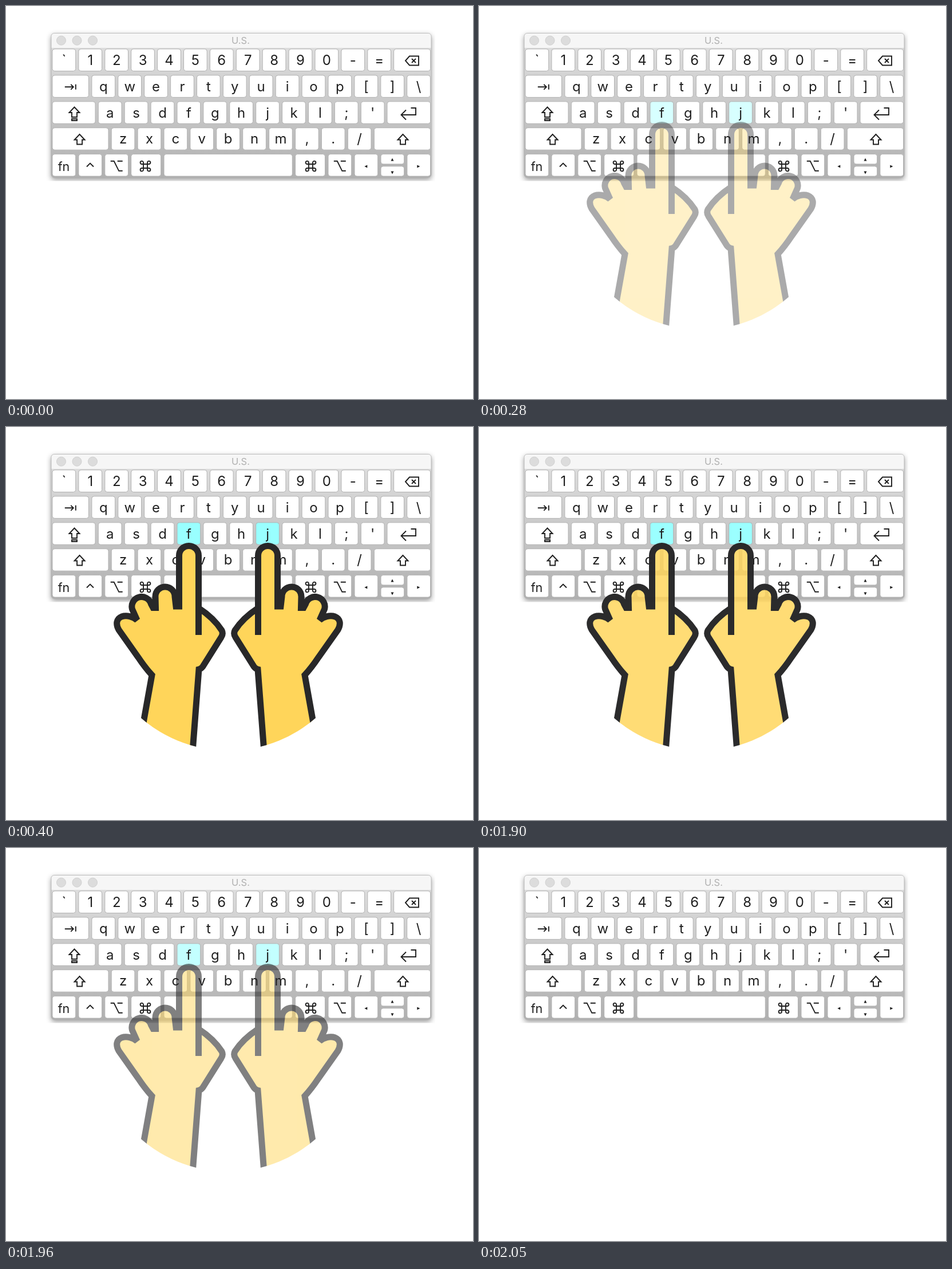
An HTML page that plays this animation: 816 px wide and 686 px high, repeating every 2300 ms.

```html
<!DOCTYPE html>
<html lang="en">
<head>
<meta charset="utf-8">
<title>Home row</title>
<style>
  html, body { margin: 0; width: 100%; height: 100%; overflow: hidden; background: #fff; }
  svg { display: block; }
  text { font: 24px Inter, sans-serif; text-anchor: middle; fill: #1f1f1f; }
  .title { font-size: 16.5px; fill: #b0b0b0; }
  .small { font-size: 21.5px; }
  .key { fill: #fff; stroke: #b2b2b2; }
  .icon { fill: none; stroke: #1f1f1f; stroke-width: 1.9; }
  .solid { fill: #1f1f1f; }
  .hand { fill: #ffd55a; stroke: #282829; stroke-width: 11; stroke-miterlimit: 3; }
</style>
</head>
<body>
<svg width="816" height="686" viewBox="0 0 816 686">
  <defs>
    <linearGradient id="body" x2="0" y2="1">
      <stop stop-color="#e2e2e2"/><stop offset="1" stop-color="#b0b0b0"/>
    </linearGradient>
    <filter id="shadow" x="-10%" y="-20%" width="120%" height="140%">
      <feDropShadow dx="0" dy="3.5" stdDeviation="5" flood-opacity=".42"/>
    </filter>
    <clipPath id="panel"><path d="M66 39H750V305.500H66Z"/></clipPath>
    <clipPath id="cuff"><circle cx="388.5" cy="332.4" r="232.6"/></clipPath>
    <path id="shape" d="M336.500 224.500A17 17 0 0 0 302.500 224.500V313H297L295 296A17 17 0 0 0 261 296L261.500 315.500H257L253.500 309
      A17 17 0 0 0 220.500 318L229 337C222 331 211 328 202 331C192 335 192 345 197 354L231 402Q243 420 255 433
      L234.200 549L325 580L337 423Q341 422 344 418L376 367Q380 361 377 355C368 341 355 328 336.500 316ZM336.500 224V363"/>
  </defs>
  <g clip-path="url(#panel)">
    <rect x="79" y="47.500" width="664" height="252" rx="5" fill="url(#body)" filter="url(#shadow)"/>
    <path d="M79 73V52.500a5 5 0 0 1 5-5H738a5 5 0 0 1 5 5V73Z" fill="#f6f6f6"/>
    <rect x="79" y="47.500" width="664" height="252" rx="5" fill="none" stroke="#aaa" stroke-opacity=".7"/>
  </g>
  <g fill="#dcdcdc" stroke="#d0d0d0">
    <circle cx="96.500" cy="60.200" r="8"/><circle cx="124" cy="60.200" r="8"/><circle cx="151.500" cy="60.200" r="8"/>
  </g>
  <text class="title" x="410" y="66.300">U.S.</text>
  <g id="keys"></g>
  <g id="hands" clip-path="url(#cuff)">
    <use class="hand" href="#shape"/>
    <use class="hand" href="#shape" transform="matrix(-1 0 0 1 777 0)"/>
  </g>
</svg>
<script>
const keys = document.getElementById('keys');
const hands = document.getElementById('hands');
const PITCH = 45.9, TOP = 75, HEIGHT = 38.5;
const homeKeys = [];

function add(tag, attrs) {
  const node = document.createElementNS('http://www.w3.org/2000/svg', tag);
  for (const name in attrs) node.setAttribute(name, attrs[name]);
  return keys.appendChild(node);
}

function addKey(x, row, width = 40.7, dy = 0, height = HEIGHT) {
  return add('rect', { class: 'key', x, y: TOP + row * PITCH + dy, width, height, rx: 4 });
}

function addLabel(label, x, y, cls = '') {
  add('text', { class: cls, x, y }).textContent = label;
}

function addIcon(d, x, y, cls = 'icon') {
  add('path', { class: cls, d, transform: `translate(${x} ${y})` });
}

[['`1234567890-=', 81], ['qwertyuiop[]\\', 149.9], ["asdfghjkl;'", 161.3], ['zxcvbnm,./', 184.2]]
  .forEach(([chars, start], row) => [...chars].forEach((char, i) => {
    const x = start + i * PITCH;
    const key = addKey(x, row);
    if (char === 'f' || char === 'j') homeKeys.push(key);
    addLabel(char, x + 20.4, TOP + row * PITCH + 27.7);
  }));

// Wide keys and bottom row: x, row, width
[[677.6, 0, 64], [81, 1, 63.5], [81, 2, 75], [666, 2, 75.6], [81, 3, 98], [643.3, 3, 98.3],
 [81, 4], [126.9, 4], [172.8, 4], [218.7, 4, 52], [276, 4, 224.3], [505.5, 4, 52], [563, 4],
 [609, 4], [655, 4, 40.7, 0, 17.3], [655, 4, 40.7, 21.2, 17.3], [700.9, 4]]
  .forEach(spec => addKey(...spec));

const SHIFT = 'M0-9L9 .5H4.500V8.500H-4.500V.5H-9Z';
const OPTION = 'M-10.500-8.500H-4.500L4 8.500H10.500M1.500-8.500H10.500';
const COMMAND = 'M-3.500-6.200a2.700 2.700 0 1 0-2.700 2.700H6.200a2.700 2.700 0 1 0-2.700-2.700V6.200a2.700 2.700 0 1 0 2.700-2.700H-6.200a2.700 2.700 0 1 0 2.700 2.700Z';

addIcon('M-11.500 0L-4.500-8H11.500V8H-4.500ZM-.5-3.500L6.500 3.500M6.500-3.500L-.5 3.500', 709.5, 95.5);
addIcon('M-10 0H5M.5-4.500L5 0L.5 4.500M9-4.500V4.500', 112.8, 141.3);
addIcon(SHIFT + 'M-4.500 11.500H4.500V14.500H-4.500Z', 119.5, 185.5);
addIcon('M4.500-11H13V1H-12M-4-7.500L-12.500 1L-4 9.500', 703, 189);
addIcon(SHIFT, 128.6, 233);
addIcon(SHIFT, 693.5, 233);
addLabel('fn', 101, 287.5, 'small');
addIcon('M-6 3L0-3L6 3', 147, 277.5);
for (const x of [193.2, 583.3]) addIcon(OPTION, x, 279.3);
for (const x of [243.5, 532.5]) addIcon(COMMAND, x, 279.5);
addIcon('M-2.500 0L2.500-2.500V2.500Z', 628.8, 280, 'solid');
addIcon('M2.500 0L-2.500-2.500V2.500Z', 720.8, 280, 'solid');
addIcon('M0-2.500L2.500 2.500H-2.500Z', 675, 268, 'solid');
addIcon('M0 2.500L2.500-2.500H-2.500Z', 675, 291, 'solid');

// Six 30 ms steps in and out; outlines and home keys fade slightly ahead of the skin.
function draw() {
  const t = performance.now() % 2300;
  const step = Math.min(Math.floor((t - 220) / 30), 6 - Math.floor((t - 1870) / 30));
  const skin = Math.max(0, Math.min(6, step)) / 6;
  const line = Math.min(1, skin * 1.18);
  hands.setAttribute('opacity', line);
  hands.setAttribute('fill-opacity', line ? skin / line : 0);
  for (const key of homeKeys) key.style.fill = `rgb(${255 - 102 * line}, 255, 255)`;
  requestAnimationFrame(draw);
}
draw();
</script>
</body>
</html>
```
